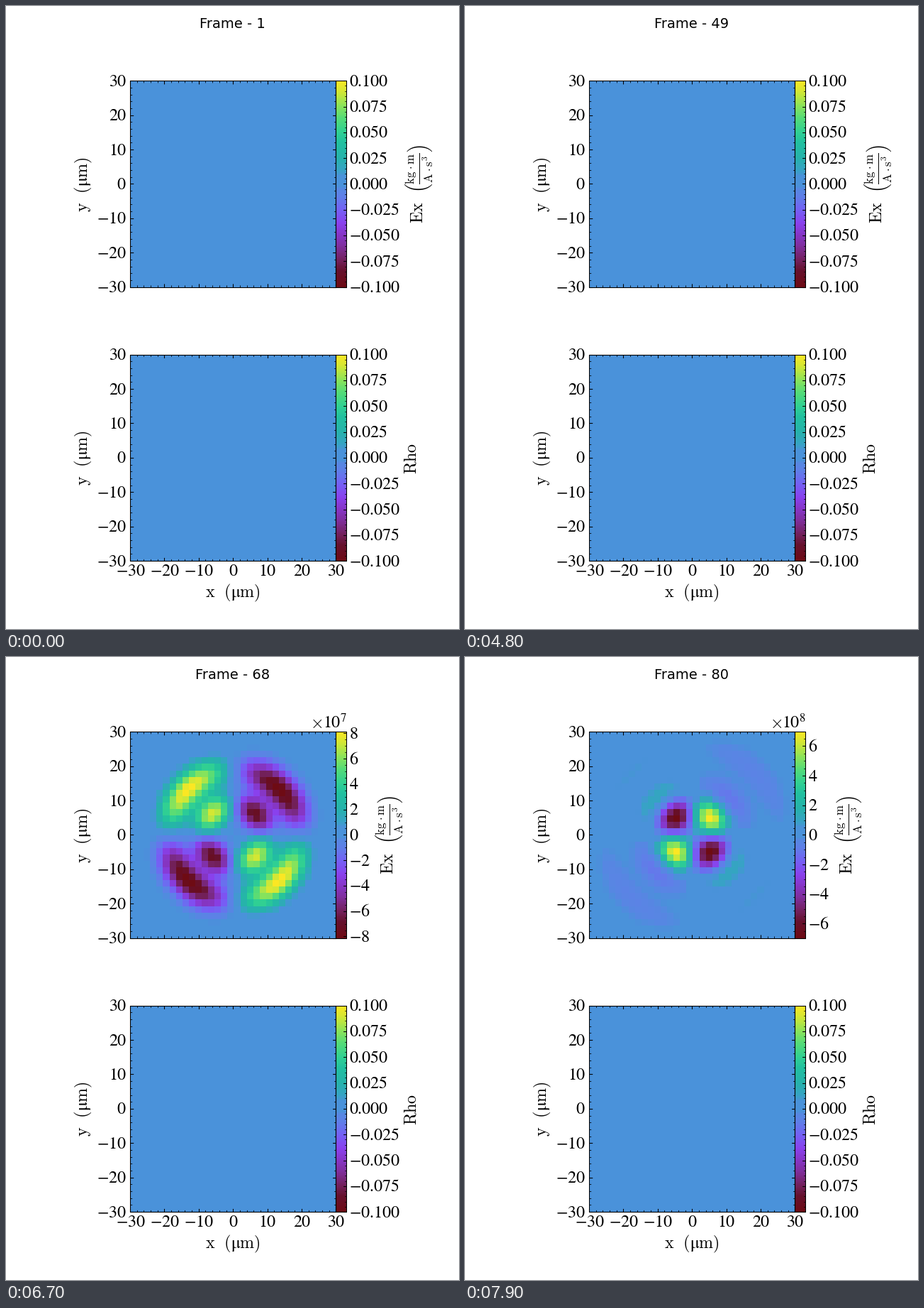
These frames come from a looping animation (639x877 px, 8 s). A matplotlib script:

```python
import numpy as np
import matplotlib.pyplot as plt
from matplotlib.animation import FuncAnimation
from matplotlib.collections import LineCollection
from matplotlib.colors import LinearSegmentedColormap
from matplotlib.ticker import MaxNLocator

W, H, DPI = 639, 877, 128
PX = 72 / DPI                        # points per pixel
FRAMES, START = 80, 56               # the field is zero before START
LEFT, SIZE, BAR = 175.5, 290.4, 15   # panel edge, panel side, colorbar width
RIGHT = LEFT + SIZE
TOPS = (105.7, 491.2)
CELLS = 32
MAJOR, MINOR = (4.7, 1.07), (2.7, .8)   # tick length and width

plt.rcParams.update({"font.family": "Liberation Serif", "mathtext.fontset": "stix"})

fig = plt.figure(figsize=(W / DPI, H / DPI), dpi=DPI, facecolor="white")
ax = fig.add_axes([0, 0, 1, 1])
ax.axis("off")

CMAP = LinearSegmentedColormap.from_list("spectrum", [
    (0, "#6e0b14"), (.08, "#66122e"), (.125, "#722058"), (.2, "#80309f"),
    (.25, "#8636c4"), (.31, "#8a42ee"), (.375, "#7561f5"), (.44, "#5f80e8"),
    (.475, "#5688e2"), (.49, "#4a92da"), (.54, "#4a92da"), (.565, "#38a3c6"),
    (.625, "#27b2ac"), (.7, "#22c0a0"), (.75, "#30d094"), (.82, "#55dc78"),
    (.88, "#8ce45a"), (.94, "#cce838"), (1, "#fbe723")])

# Quadrupole wave: three rings given at a few times as amplitude, radius, width
TIMES = (57, 68, 75, 80)
PEAKS = (6.74e-6, 8.12e7, 2.135e8, 6.97e8)
RINGS = (
    ((1, -.9, -1, 1), (7, 8.7, 5.5, 7), (3.9, 4.1, 2.8, 3.9)),
    ((-.17, -1, -.36, -.09), (15.5, 18.8, 22.9, 25.5), (4.2, 4.3, 3.8, 4)),
    ((0, 0, .22, -.17), (9, 9, 11, 15), (2.5, 2.5, 2.6, 3.6)),
)
centers = (np.arange(CELLS) + .5) * 60 / CELLS - 30
X, Y = np.meshgrid(centers, centers)
R = np.hypot(X, Y)
ANGULAR = 2 * X * Y / R**2


def shape(n):
    total = np.zeros_like(R)
    for ring in RINGS:
        amp, radius, width = (np.interp(n, TIMES, v) for v in ring)
        total += amp * np.exp(-((R - radius) / width) ** 2)
    return total * ANGULAR


gains = [np.log10(p / np.abs(shape(n)).max()) for n, p in zip(TIMES, PEAKS)]
GAIN_T = (56, 57, 60, 64, 68, 75, 80)
GAIN = (-7.5, gains[0], -.5, 5, *gains[1:])


def field(n):
    if n < START:
        return np.zeros_like(R), .1
    f = shape(n) * 10 ** np.interp(n, GAIN_T, GAIN)
    return f, np.abs(f).max()


def text(x, y, s, ha="center", size=24, **kw):
    return ax.text(x, y, s, ha=ha, va="baseline", fontsize=size * PX,
                   color="black", **kw)


def upright(x, y, s):
    return text(x, y, s, rotation=90, rotation_mode="anchor",
                math_fontfamily="cm")


def lines(segments, width=1.07):
    c = LineCollection(segments, colors="black", linewidths=width * PX, zorder=3)
    c.set_snap(False)
    ax.add_collection(c, autolim=False)
    return c


def picture(data, x0, x1, top):
    return ax.imshow(data, cmap=CMAP, vmin=-1, vmax=1, origin="lower",
                     interpolation="nearest", aspect="auto",
                     extent=(x0, x1, top + SIZE, top))


def pixel(v):
    return np.floor(v) + .5


def box(x0, y0, x1, y1):
    x0, y0, x1, y1 = map(pixel, (x0, y0, x1, y1))
    lines([[(x0 - .5, y0), (x1 + .5, y0)], [(x0 - .5, y1), (x1 + .5, y1)],
           [(x0, y0), (x0, y1)], [(x1, y0), (x1, y1)]])


class Bar:
    """Colorbar with ticks that follow the value range."""

    def __init__(self, top, name, gap):
        self.top, self.gap = top, gap
        self.right = RIGHT + BAR
        picture(np.linspace(-1, 1, 256)[:, None], RIGHT, self.right, top)
        box(RIGHT, top, self.right, top + SIZE)
        self.major, self.minor = lines([], MAJOR[1]), lines([], MINOR[1])
        self.labels = [text(484, top, "", "left") for _ in range(12)]
        self.power = text(480.5, top - 5.7, "", "right")
        self.times = ax.annotate(r"${\times}$", (0, top - 5.7), xycoords=(self.power, "data"),
                                 ha="right", va="baseline", fontsize=24 * PX,
                                 math_fontfamily="cm")
        self.name = upright(0, top + SIZE / 2, name)

    def place(self, v):
        return self.top + SIZE * (1 - v) / 2

    def mark(self, group, values, length):
        group.set_segments([[(self.right - length, y), (self.right, y)]
                            for y in pixel(self.place(values))])

    def update(self, vmax):
        loc = MaxNLocator(9, steps=[1, 2, 2.5, 5, 10])
        major = loc.tick_values(-vmax, vmax)
        step = major[1] - major[0]
        major = major[np.abs(major) <= vmax * 1.0001]
        exp = int(np.floor(np.log10(major[-1] * 1.0001)))
        if -2 < exp < 3:
            exp = 0
        unit = step / 10.0**exp
        digits = next(d for d in range(6) if abs(unit * 10**d - round(unit * 10**d)) < 1e-4)

        lead = step / 10 ** np.floor(np.log10(step * 1.0001))
        sub = step / (4 if abs(lead - 2) < .01 else 5)
        k = int(vmax * 1.0001 / sub)
        self.mark(self.major, major / vmax, MAJOR[0])
        self.mark(self.minor, np.arange(-k, k + 1) * sub / vmax, MINOR[0])

        for i, label in enumerate(self.labels):
            label.set_visible(i < len(major))
            if i < len(major):
                v = round(major[i] / 10.0**exp, digits) + 0.0
                label.set_text("${%.*f}$" % (digits, v))
                label.set_y(self.place(major[i] / vmax) + 7)
        self.power.set_text("$10^{%d}$" % exp)
        self.power.set_visible(exp != 0)
        self.times.set_visible(exp != 0)
        wide = .685 + .5 * (1 + digits) + (.25 if digits else 0)
        self.name.set_x(484.6 + 24 * wide + self.gap)


def panel(top):
    img = picture(np.zeros_like(R), LEFT, RIGHT, top)
    bottom = top + SIZE
    box(LEFT, top, RIGHT, bottom)
    for (s, width), values in ((MAJOR, range(-30, 31, 10)), (MINOR, range(-30, 31, 2))):
        segs = []
        for v in values:
            d = SIZE * (v + 30) / 60
            x, y = pixel(LEFT + d), pixel(bottom - d)
            segs += [[(x, top), (x, top + s)], [(x, bottom - s), (x, bottom)],
                     [(LEFT, y), (LEFT + s, y)], [(RIGHT - s, y), (RIGHT, y)]]
        lines(segs, width)
    for v in range(-30, 31, 10):
        text(170, bottom - SIZE * (v + 30) / 60 + 7, "${%d}$" % v, "right")
    upright(115.5, top + SIZE / 2, r"$\rm{y}\ \ (\rm{μm})$")
    return img


ex = panel(TOPS[0])
panel(TOPS[1])
for v in range(-30, 31, 10):
    text(LEFT + SIZE * (v + 30) / 60, 802, "${%d}$" % v)
text(320, 832, r"$\rm{x}\ \ (\rm{μm})$", math_fontfamily="cm")

ex_bar = Bar(TOPS[0], r"$\rm{Ex}\ \ \left(\frac{\rm{kg} \cdot \rm{m}}"
                      r"{\rm{A} \cdot \rm{s}^{3}}\right)$", 33.5)
Bar(TOPS[1], r"$\rm{Rho}$", 23.5).update(.1)
title = text(W / 2, 31, "", size=19.5, family="DejaVu Sans")

ax.set_xlim(0, W)
ax.set_ylim(H, 0)


def draw(i):
    n = i + 1
    f, vmax = field(n)
    ex.set_data(f / vmax)
    ex_bar.update(vmax)
    title.set_text(f"Frame - {n}")
    return ()


anim = FuncAnimation(fig, draw, frames=FRAMES, init_func=lambda: draw(0),
                     interval=100, repeat=True, repeat_delay=0, blit=False)
plt.show()
```
